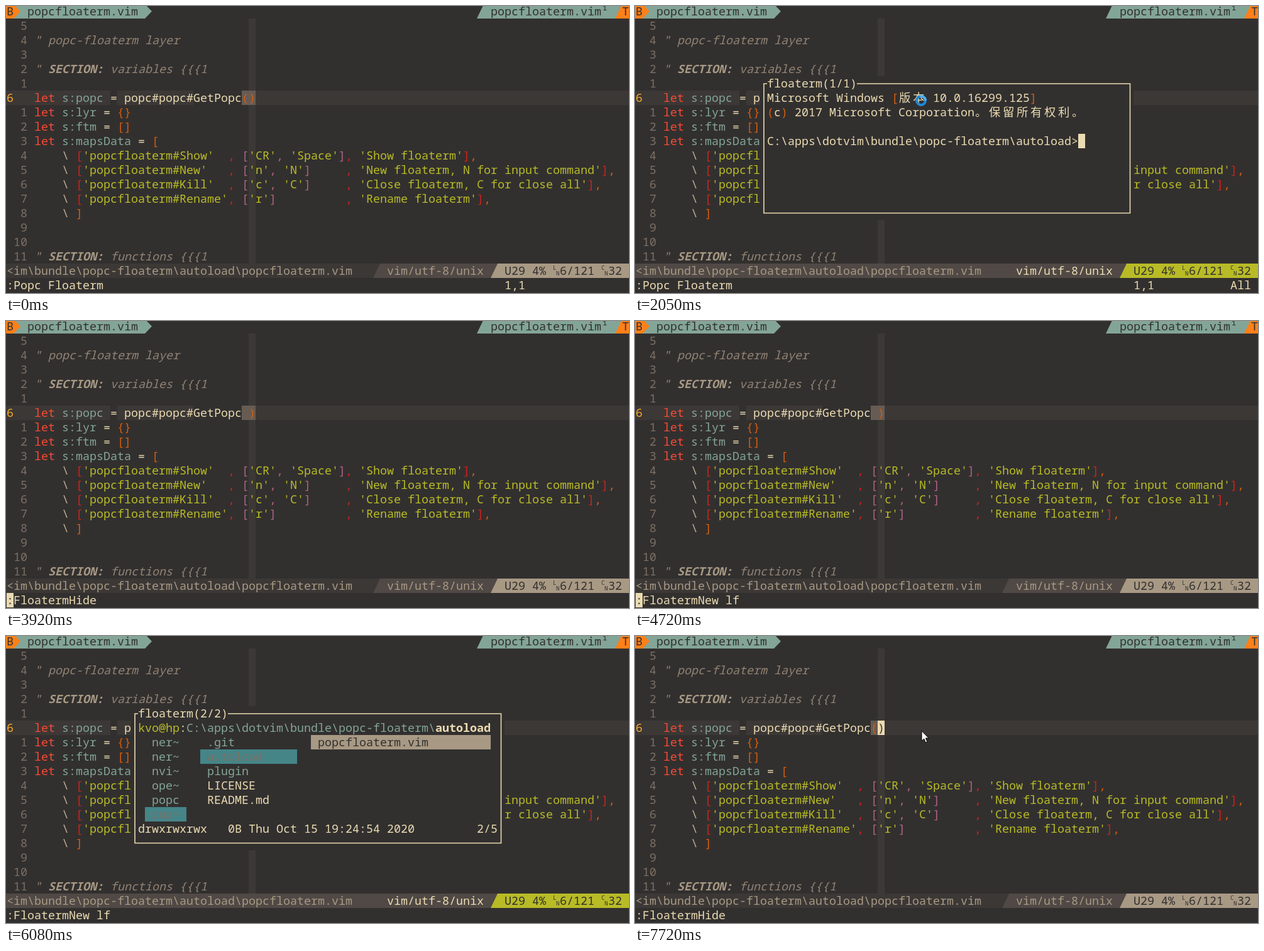
Recreate the animation shown at these times as an HTML page with a canvas. Size 991 by 458 pixels, loop 8 s.

```html
<!DOCTYPE html>
<html lang="zh-Hans">
<head>
<meta charset="utf-8">
<title>Floating terminal</title>
<style>
html, body { margin: 0; width: 100%; height: 100%; overflow: hidden; background: #32302f; }
canvas { display: block; }
</style>
</head>
<body>
<canvas id="stage" width="991" height="458"></canvas>
<script>
const ctx = document.getElementById('stage').getContext('2d');
const W = 991, CW = 11, CH = 23, LOOP = 8000;
const FONT = '18.333px "Noto Sans Mono", "Noto Sans CJK SC", "Noto Sans CJK", monospace';
const C = {
  bg: '#32302f', line: '#3c3836', panel: '#504945', match: '#665c54', num: '#7c6f64',
  dim: '#928374', tan: '#a89984', cont: '#bdae93', fg: '#ebdbb2', red: '#fb4934',
  rust: '#d65d0e', crimson: '#cc241d', purple: '#b16286', blue: '#83a598',
  teal: '#458588', green: '#b8bb26', orange: '#fe8019', amber: '#f9a825'
};
const PROMPT = 'C:\\apps\\dotvim\\bundle\\popc-floaterm\\autoload>';

const X = col => 1 + col * CW;
const Y = row => row * CH - 3;

function fill(col, row, cols, color, rows = 1) {
  ctx.fillStyle = color;
  ctx.fillRect(X(col), Y(row), cols * CW, rows * CH);
}

function poly(color, ...pts) {
  ctx.fillStyle = color;
  ctx.beginPath();
  for (let i = 0; i < pts.length; i += 2) ctx.lineTo(pts[i], pts[i + 1]);
  ctx.fill();
}

// One glyph per grid cell, two cells for wide characters.
function put(col, row, text, color = C.fg, style = '') {
  ctx.font = style + ' ' + FONT;
  ctx.fillStyle = color;
  for (const ch of text) {
    const wide = ch > '\u2fff';
    if (ch !== ' ') ctx.fillText(ch, X(col) + (wide ? 1 : 0), Y(row) + 18);
    col += wide ? 2 : 1;
  }
  return col;
}

// Consecutive pieces: text, color, text, color, ...
function runs(col, row, ...parts) {
  for (let i = 0; i < parts.length; i += 2) col = put(col, row, parts[i], parts[i + 1]);
}

function arrow(col, color) {
  const x = X(col);
  poly(color, x, -3, x + CW, 8.5, x, 20);
}

function slant(col, row, color) {
  const x = X(col), y = Y(row);
  poly(color, x, y + CH, x + CW, y, x + CW, y + CH);
}

function tabline() {
  fill(-1, 0, 2, C.orange);
  fill(1, 0, 19, C.blue);
  arrow(1, C.orange);
  arrow(20, C.blue);
  put(0, 0, 'B', C.bg);
  put(3, 0, 'popcfloaterm.vim', C.bg);
  slant(68, 0, C.blue);
  fill(69, 0, 20, C.blue);
  slant(88, 0, C.orange);
  fill(89, 0, 2, C.orange);
  put(70, 0, 'popcfloaterm.vim¹', C.bg);
  put(89, 0, 'T', C.bg);
}

function section(row, name) {
  put(4, row, '"', C.dim, 'italic');
  put(6, row, 'SECTION:', C.tan, 'italic bold');
  put(15, row, name + ' {{{1', C.dim, 'italic');
}

function mapRow(row, name, keys, desc) {
  put(8, row, '\\', C.cont);
  put(10, row, '[', C.crimson);
  put(11, row, `'popcfloaterm#${name}'`, C.green);
  put(32, row, ',', C.crimson);
  let col = put(34, row, '[', C.purple);
  keys.forEach((key, i) => {
    if (i) col = put(col, row, ', ', C.purple);
    col = put(col, row, `'${key}'`, C.green);
  });
  put(col, row, ']', C.purple);
  put(49, row, ',', C.crimson);
  runs(51, row, `'${desc}'`, C.green, ']', C.crimson, ',', C.rust);
}

function editor(s) {
  fill(35, 1, 1, C.line, 17);
  fill(-1, 6, 92, C.line);
  fill(15, 6, 1, C.bg);
  fill(27, 6, 7, C.bg);
  for (let row = 1; row < 18; row++) {
    if (row !== 6) put(1, row, String(Math.abs(row - 6)).padStart(2), C.num);
  }
  put(0, 6, '6', C.amber);
  put(4, 2, '" popc-floaterm layer', C.dim, 'italic');
  section(4, 'variables');
  section(17, 'functions');

  const assign = (row, name, ...rest) =>
    runs(4, row, 'let ', C.red, 's:' + name, C.blue, ' = ', C.fg, ...rest);
  assign(6, 'popc', 'popc#popc#GetPopc', C.fg);
  assign(7, 'lyr', '{}', C.rust);
  assign(8, 'ftm', '[]', C.rust);
  assign(9, 'mapsData', '[', C.rust);
  mapRow(10, 'Show', ['CR', 'Space'], 'Show floaterm');
  mapRow(11, 'New', ['n', 'N'], 'New floaterm, N for input command');
  mapRow(12, 'Kill', ['c', 'C'], 'Close floaterm, C for close all');
  mapRow(13, 'Rename', ['r'], 'Rename floaterm');
  runs(8, 14, '\\ ', C.cont, ']', C.rust);

  fill(34, 6, 1, C.match);
  fill(35, 6, 1, s.cursor ? C.fg : C.match);
  if (!s.cmdCursor) put(34, 6, '(', C.rust);
  put(35, 6, ')', s.cursor ? C.bg : C.rust);
}

function badge(col, letter) {
  ctx.font = '9px "Noto Sans Mono", monospace';
  ctx.fillText(letter, X(col), Y(18) + 10);
  ctx.fillText('N', X(col) + 5, Y(18) + 19);
}

function status(s) {
  const active = s.win ? C.green : C.tan;
  fill(-1, 18, 92, C.panel);
  if (!s.win) {
    fill(-1, 18, 55, C.line);
    slant(53, 18, C.panel);
  }
  put(0, 18, '<im\\bundle\\popc-floaterm\\autoload\\popcfloaterm.vim', C.tan);
  put(55, 18, 'vim/utf-8/unix', s.win ? C.fg : C.tan);
  slant(70, 18, active);
  fill(71, 18, 20, active);
  put(72, 18, 'U29 4%', C.bg);
  put(80, 18, '6/121', C.bg);
  put(87, 18, '32', C.bg);
  badge(79, 'L');
  badge(86, 'C');
}

function command(s) {
  put(0, 19, s.cmd);
  if (s.cmdCursor) {
    fill(0, 19, 1, C.fg);
    put(0, 19, ':', C.bg);
  }
  put(72, 19, s.pos);
  put(79, 19, s.keys);
  put(86, 19, s.all);
}

function frame(title) {
  fill(18, 5, 54, C.bg, 10);
  ctx.strokeStyle = C.fg;
  ctx.lineWidth = 1.6;
  ctx.beginPath();
  ctx.moveTo(210, 124);
  ctx.lineTo(205, 124);
  ctx.lineTo(205, 330.5);
  ctx.lineTo(787.5, 330.5);
  ctx.lineTo(787.5, 124);
  ctx.lineTo(353, 124);
  ctx.stroke();
  put(19, 5, title);
}

function shell(s) {
  frame('floaterm(1/1)');
  runs(19, 6, 'Microsoft Windows ', C.fg, '[', C.rust, '版本 10.0.16299.125', C.fg, ']', C.rust);
  runs(19, 7, '(', C.rust, 'c', C.fg, ')', C.rust, ' 2017 Microsoft Corporation。保留所有权利。', C.fg);
  let end = put(19, 9, PROMPT + s.typed), row = 9;
  if (s.listed) {
    put(19, 10, 'popcfloaterm.vim');
    end = put(19, row = 12, PROMPT);
  }
  fill(end, row, 1, C.fg);
}

function files(s) {
  frame('floaterm(2/2)');
  if (s.lf > 0) {
    runs(19, 6, 'kvo@hp', C.green, ':', C.fg, PROMPT.slice(0, 36), C.blue);
    put(62, 6, 'autoload', C.fg, 'bold');
    fill(20, 12, 6, C.teal);
    fill(28, 8, 14, C.teal);
    ['ner~', 'ner~', 'nvi~', 'ope~', 'popc', 'pop~'].forEach((name, i) =>
      put(21, 7 + i, name, i === 5 ? C.num : C.blue));
    ['.git', 'autoload', 'plugin', 'LICENSE', 'README.md'].forEach((name, i) =>
      put(29, 7 + i, name, i === 1 ? C.num : i < 3 ? C.blue : C.fg));
  }
  if (s.lf > 1) {
    fill(44, 7, 26, C.tan);
    put(45, 7, 'popcfloaterm.vim', C.bg);
    put(19, 13, 'drwxrwxrwx   0B Thu Oct 15 19:24:54 2020');
    put(68, 13, '2/5');
  }
}

function busy(t) {
  const a = Math.floor(t / 65) * 0.55;
  const ring = (color, from, to) => {
    ctx.strokeStyle = color;
    ctx.beginPath();
    ctx.arc(455, 151, 7, from, to);
    ctx.stroke();
  };
  ctx.lineWidth = 4;
  ring('#2188d8', 0, Math.PI * 2);
  ring('#4fb0f0', a, a + 1.8);
}

function pointer() {
  const shape = new Path2D('M456 151.5v16l3.7-3.5 2.6 6 2.6-1.2-2.6-5.8h5z');
  ctx.fillStyle = '#fff';
  ctx.fill(shape);
  ctx.strokeStyle = '#000';
  ctx.lineWidth = 1;
  ctx.stroke(shape);
}

// Each entry changes part of the screen state from that time on.
const start = {
  cursor: 0, cmd: ':Popc Floaterm', pos: '1,1', keys: '', all: '', cmdCursor: 0,
  win: 0, typed: '', listed: 0, lf: 0, mouse: ''
};
const timeline = [
  [260, { cursor: 1 }],
  [530, { cursor: 0 }],
  [870, { cursor: 1 }],
  [930, { keys: '<20>' }],
  [1060, { keys: '<20><20>' }],
  [1190, { cursor: 0 }],
  [1390, { keys: '', cmdCursor: 1 }],
  [1460, { all: 'All', cmdCursor: 0, cursor: 1 }],
  [2050, { win: 1, mouse: 'busy' }],
  [2400, { typed: 'l' }],
  [2530, { typed: 'ls' }],
  [2730, { mouse: '' }],
  [3190, { listed: 1 }],
  [3920, { win: 0, cmd: ':FloatermHide', pos: '', all: '', cmdCursor: 1, cursor: 0 }],
  [3990, { cmdCursor: 0, cursor: 1, mouse: 'arrow' }],
  [4250, { keys: '<20>', mouse: '' }],
  [4590, { keys: '<20><20>' }],
  [4650, { keys: '', cmd: ':FloatermNew lf', cmdCursor: 1, cursor: 0 }],
  [4790, { cmdCursor: 0 }],
  [4860, { win: 2, mouse: 'busy' }],
  [5530, { lf: 1 }],
  [5660, { lf: 2 }],
  [6080, { mouse: '' }],
  [7660, { win: 0, cmd: ':FloatermHide' }],
  [7720, { cursor: 1, mouse: 'arrow' }]
];

function draw(t) {
  const s = { ...start };
  for (const [at, change] of timeline) if (t >= at) Object.assign(s, change);
  ctx.fillStyle = C.bg;
  ctx.fillRect(0, 0, W, 458);
  editor(s);
  tabline();
  status(s);
  command(s);
  if (s.win === 1) shell(s);
  if (s.win === 2) files(s);
  if (s.mouse === 'busy') busy(t);
  if (s.mouse === 'arrow') pointer();
}

function tick() {
  draw(performance.now() % LOOP);
  requestAnimationFrame(tick);
}
tick();
</script>
</body>
</html>
```
